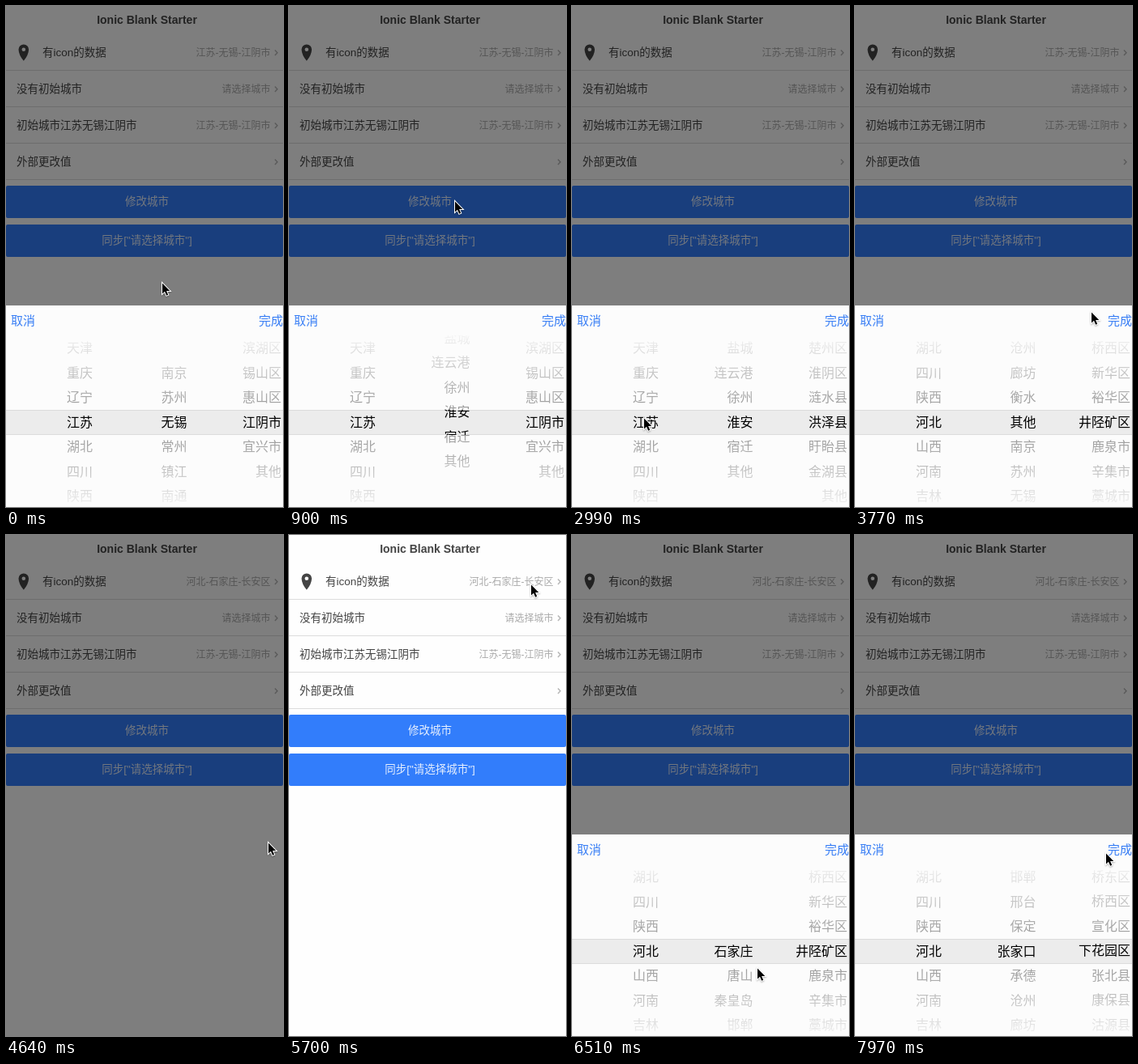
Recreate the animation shown at these times as an HTML page with a canvas. Size 342 by 619 pixels, loop 8 s.

```html
<!DOCTYPE html>
<html lang="zh-CN">
<head>
<meta charset="utf-8">
<title>City picker</title>
<style>
  html, body { margin: 0; width: 100%; height: 100%; overflow: hidden; background: #fff; }
  canvas { display: block; }
</style>
</head>
<body>
<canvas id="stage" width="342" height="619"></canvas>
<script>
const W = 342, H = 619, LOOP = 8000;
const ctx = document.getElementById('stage').getContext('2d');
const FONT = '"Liberation Sans", "Noto Sans CJK SC", "Noto Sans CJK", sans-serif';
const ITEM_H = 30.5, CENTER_Y = 514, PANEL_Y = 370, LIST_Y = 407, BAND_Y = 499;

const words = s => s.split(' ');
const provinces = words('北京 上海 天津 重庆 辽宁 江苏 湖北 四川 陕西 河北 山西 河南 吉林');
const jiangsu = words('南京 苏州 无锡 常州 镇江 南通 泰州 扬州 盐城 连云港 徐州 淮安 宿迁 其他');
const hebei = words('石家庄 唐山 秦皇岛 邯郸 邢台 保定 张家口 承德 沧州 廊坊 衡水 其他');
const wuxi = words('崇安区 南长区 北塘区 滨湖区 锡山区 惠山区 江阴市 宜兴市 其他');
const huaian = words('清河区 清浦区 楚州区 淮阴区 涟水县 洪泽县 盱眙县 金湖县 其他');
const shijiazhuang = words('长安区 桥东区 桥西区 新华区 裕华区 井陉矿区 鹿泉市 辛集市 藁城市');
const zhangjiakou = words('桥东区 桥西区 宣化区 下花园区 张北县 康保县 沽源县 尚义县');

// Pointer moves: start, end, x, y and the column being dragged, if any
const moves = [
  [30, 310, 203, 527],
  [520, 900, 204, 240, 'city'],
  [950, 1300, 210, 518],
  [1600, 1740, 291, 538],
  [2040, 2240, 291, 384, 'area'],
  [2410, 2820, 88, 508],
  [2990, 3230, 108, 385, 'province'],
  [3490, 3770, 291, 377],
  [3800, 4210, 323, 379],
  [5140, 5700, 298, 60],
  [6150, 6510, 228, 534],
  [6520, 6650, 213, 543],
  [6890, 7080, 213, 360, 'city'],
  [7260, 7640, 304, 484],
  [7850, 7970, 309, 392, 'area']];

const mix = (a, b, p) => a + (b - a) * p;

function ease(t, start, end) {
  const p = Math.min(1, Math.max(0, (t - start) / (end - start)));
  return p * p * (3 - 2 * p);
}

// Dragging scrolls a column by the pointer's travel; on release it snaps to an item.
function stateAt(t) {
  const s = { x: 192, y: 341, province: 5, city: 2, area: 6 };
  moves.forEach(([start, end, x, y, column], i) => {
    if (t < start) return;
    const p = ease(t, start, end), fromY = s.y;
    s.x = mix(s.x, x, p);
    s.y = mix(s.y, y, p);
    if (!column) return;
    const release = moves[i + 1]?.[0] ?? LOOP;
    s[column] += (fromY - s.y) / ITEM_H;
    s[column] = mix(s[column], Math.round(s[column]), ease(t, release, release + 80));
    if (column === 'city' && t > release + 100) s.area = 0;
    if (column === 'province') s.city *= 1 - ease(t, release + 310, release + 660);
  });
  return s;
}

function rect(x, y, w, h, color) {
  ctx.fillStyle = color;
  ctx.fillRect(x, y, w, h);
}

function text(str, x, y, size, color, align = 'left', weight = '') {
  ctx.font = `${weight} ${size}px ${FONT}`;
  ctx.textAlign = align;
  ctx.fillStyle = color;
  ctx.fillText(str, x, y + size * 0.36);
}

function row(y, label, value, x = 13) {
  text(label, x, y, 13.5, '#444');
  text(value, 326.5, y, 12, '#aaa', 'right');
  ctx.strokeStyle = '#b8b8b8';
  ctx.lineWidth = 1.5;
  ctx.stroke(new Path2D(`M332 ${y - 3}l3 3.2l-3 3.2`));
  rect(0, y + 21.5, W, 1, '#dcdcdc');
}

function button(y, label) {
  ctx.fillStyle = '#327dfb';
  ctx.beginPath();
  ctx.roundRect(0, y, W, 40, 2);
  ctx.fill();
  text(label, 174, y + 19.5, 13.5, '#e6effe', 'center');
}

function pin(x, y) {
  ctx.fillStyle = '#444';
  ctx.beginPath();
  ctx.arc(x, y, 6.3, Math.PI, 0);
  ctx.quadraticCurveTo(x + 6, y + 7, x, y + 14);
  ctx.quadraticCurveTo(x - 6, y + 7, x - 6.3, y);
  ctx.arc(x, y, 2.3, 0, 7);
  ctx.fill('evenodd');
}

function drawPage(t) {
  rect(0, 0, W, H, '#fefefe');
  text('Ionic Blank Starter', 174, 16.5, 14, '#444', 'center', 'bold');
  pin(21.8, 53.7);
  row(57.5, '有icon的数据', t < 4450 ? '江苏-无锡-江阴市' : '河北-石家庄-长安区', 45);
  row(102.5, '没有初始城市', '请选择城市');
  row(147.5, '初始城市江苏无锡江阴市', '江苏-无锡-江阴市');
  row(192.5, '外部更改值', '');
  button(222, '修改城市');
  button(270, '同步["请选择城市"]');
}

function column(items, index, right) {
  items.forEach((item, i) => {
    const offset = i - index;
    if (Math.abs(offset) < 4) text(item, right, CENTER_Y + offset * ITEM_H, 16, '#000', 'right');
  });
}

function fade(top, bottom, from, to) {
  const g = ctx.createLinearGradient(0, top, 0, bottom);
  g.addColorStop(0, `rgba(252,252,252,${from})`);
  g.addColorStop(1, `rgba(252,252,252,${to})`);
  rect(0, top, W, bottom - top, g);
}

function drawPanel(t, state) {
  const cities = t < 3560 ? jiangsu : t < 3800 ? hebei.concat(jiangsu) : hebei;
  const areas = t < 1050 ? wuxi : t < 3560 ? huaian : t < 7360 ? shijiazhuang : zhangjiakou;
  const hidden = t < 5500 ? ease(t, 4450, 4640) : 1 - ease(t, 5990, 6300);
  ctx.save();
  ctx.translate(0, hidden * (H - PANEL_Y));
  rect(0, PANEL_Y, W, H - PANEL_Y, '#fcfcfc');
  text('取消', 6, 388.5, 15, '#387ef5');
  text('完成', W, 388.5, 15, '#387ef5', 'right');
  ctx.beginPath();
  ctx.rect(0, LIST_Y, W, H - LIST_Y);
  ctx.clip();
  rect(0, BAND_Y, W, 31, '#dcdcdc');
  rect(0, BAND_Y + 1, W, 29, '#ececec');
  column(provinces, state.province, 107);
  column(cities, state.city, 223.5);
  column(areas, state.area, 340);
  fade(LIST_Y, BAND_Y, 0.97, 0.6);
  fade(BAND_Y + 31, H + 2, 0.6, 0.97);
  ctx.restore();
}

function drawCursor(x, y) {
  ctx.save();
  ctx.translate(x + 1, y + 1.5);
  const arrow = new Path2D('M0 0V13L3 10.3L5.200 15.200L7.200 14.300L5.100 9.600H9.300Z');
  ctx.shadowColor = 'rgba(0,0,0,.3)';
  ctx.shadowBlur = 2;
  ctx.shadowOffsetY = 1;
  ctx.strokeStyle = '#fff';
  ctx.lineWidth = 2;
  ctx.stroke(arrow);
  ctx.shadowColor = 'transparent';
  ctx.fillStyle = '#000';
  ctx.fill(arrow);
  ctx.restore();
}

function draw() {
  const t = performance.now() % LOOP;
  const state = stateAt(t);
  drawPage(t);
  if (t < 4790 || t >= 5990) {
    rect(0, 0, W, H, 'rgba(0,0,0,.5)');
    drawPanel(t, state);
  }
  drawCursor(state.x, state.y);
  requestAnimationFrame(draw);
}
draw();
</script>
</body>
</html>
```
